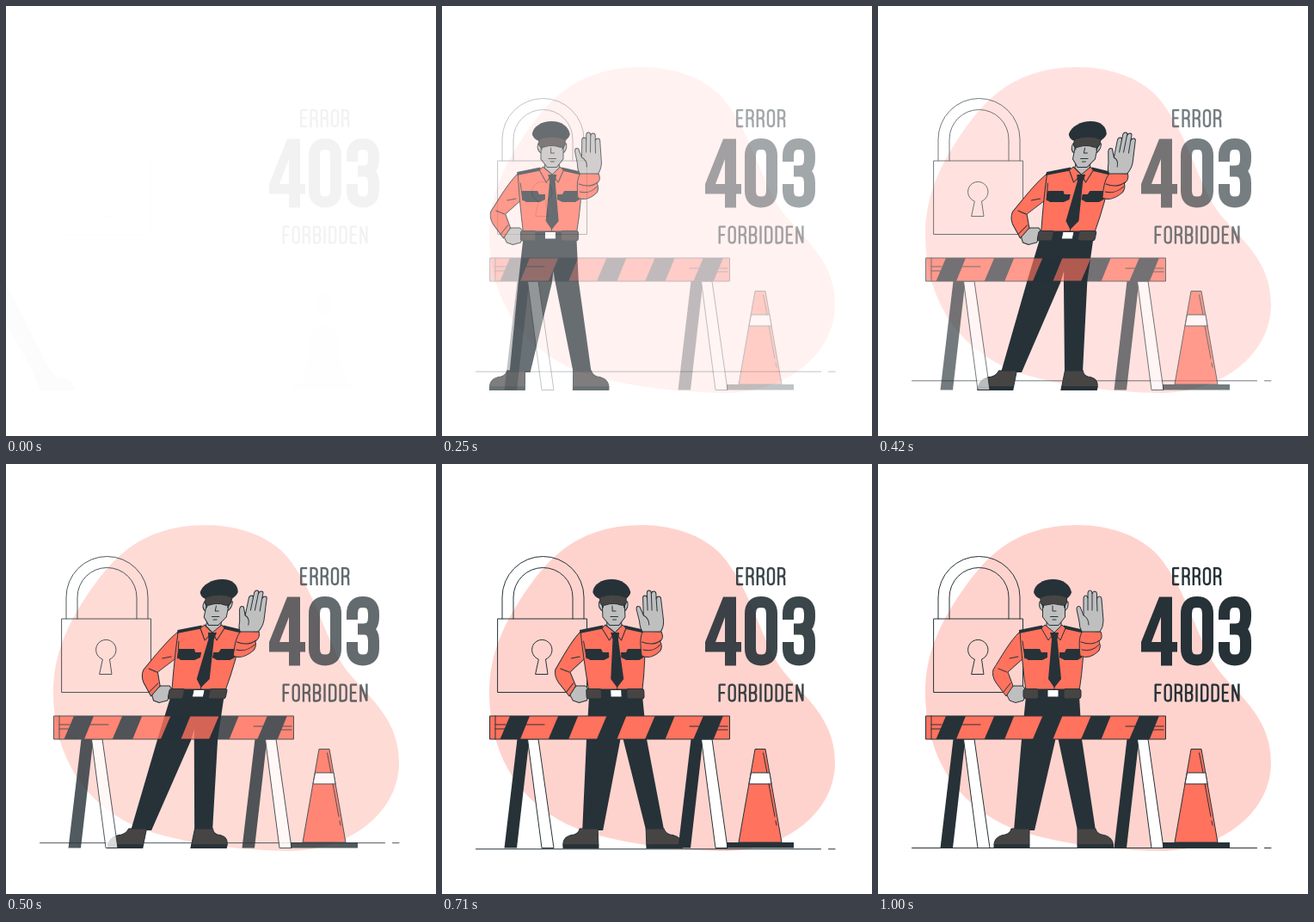
An HTML page that plays this animation: 500x500 px, repeating every 1.04 s.

```html
<!DOCTYPE html>
<html lang="en">
<head>
<meta charset="utf-8">
<title>Error 403 Forbidden</title>
<style>
  html, body { margin: 0; width: 100%; height: 100%; overflow: hidden; background: #fff; }
  svg { display: block; width: 100%; height: 100%; }
  .line { fill: none; stroke: #263238; stroke-width: 1; stroke-linejoin: round; stroke-linecap: round; }
  .ink { fill: #263238; }
  .red { fill: #ff725e; stroke: #263238; stroke-width: 1; stroke-linejoin: round; }
  .white { fill: #fff; stroke: #263238; stroke-width: 1; stroke-linejoin: round; }
  .skin { fill: #bfbfbf; stroke: #263238; stroke-width: 1; stroke-linejoin: round; }
  .gear { fill: #474444; stroke: #263238; stroke-width: 1; stroke-linejoin: round; }
  .type { fill: none; stroke: #263238; stroke-width: 2.4; stroke-linejoin: bevel; }
  .digit { fill: none; stroke: #263238; stroke-width: 13; }
</style>
</head>
<body>
<svg viewBox="0 0 500 500" role="img" aria-label="Error 403 Forbidden">
  <g class="fade">
    <path fill="#ffd3cd" d="M233 71C150 71 118 118 92 156C70 190 54 225 55 270C57 345 95 400 160 425C215 444 280 449 330 450C400 449 457 405 457 347C457 285 405 262 386 224C366 185 358 150 331 113C310 84 270 71 233 71Z"/>
  </g>

  <g id="floor"><path class="line" d="M39.5 446.5H440.5M449.5 446.5H457"/></g>

  <g class="fade">
    <path class="line" d="M65 180H168.5V265.5H65Z"/>
    <path class="line" d="M70 180V155A47.5 47.5 0 0 1 165 155V180M83 180V155A34.5 34.5 0 0 1 152 155V180"/>
    <path class="line" d="M112 227A11.7 11.7 0 1 1 120.5 227L123 244.5H109Z"/>
  </g>

  <g id="guard">
    <!-- legs and shoes -->
    <path class="ink" d="M172 270H234L237 320L253 426H232L210 322L207.5 308L206 322L182 426H158L167 320Z"/>
    <path class="gear" d="M155 424H176V443H135C135 436 140 432 148 431Q154 429 155 424Z"/>
    <path class="gear" d="M232 424H253Q254 429 260 431C268 432 273 436 273.5 443H232Z"/>
    <path class="ink" d="M134.5 442.5H176.5V447H134.5ZM231.5 442.5H274V447H231.5Z"/>
    <!-- arm on the hip -->
    <path class="skin" d="M151 262L158 258H168L172 262L172.5 266L169 275L160 277.5L153 275L150 269Z"/>
    <path class="red" d="M165 195C153 206 143 225 134 239Q132 246 137 254L149 270L157 258L151 242L171 224Z"/>
    <path class="line" d="M140 238L150 242M153 226L163 224M146 265L154 255"/>
    <!-- torso -->
    <path class="red" d="M165 195L192 189H215L239 195Q240 226 234 264H172Q167 226 165 195Z"/>
    <path class="ink" d="M164 193L191 187.5V191.5L164 197ZM216 187.5L240 193L240.5 197L216 191.5Z"/>
    <path class="ink" d="M170 215H188L190 219H197V225L191 228H175L170 225ZM211 219H217L219 215H237V225L232 228H217L211 225Z"/>
    <path class="line" d="M205 202V262M168 206L171 226"/>
    <path class="skin" d="M196 180H213V191L205 198L196 191Z"/>
    <path class="red" d="M194 187L205 196L198 205L190 191ZM214 187L205 196L212 205L218 191Z"/>
    <path class="ink" d="M200 196H210L208.5 204L213 250L205 260L198 250L202 204Z"/>
    <!-- head -->
    <path class="skin" d="M192 160H188Q186 168 192 171ZM217 160H221Q222 168 217 171Z"/>
    <path class="skin" d="M191.5 156H217.5V178L210 187.5H199L191.5 178Z"/>
    <path class="line" d="M203 165V171H207M200.5 177.5H209M203 181H207"/>
    <path class="ink" d="M190 154H193V168L190.5 164ZM216 154H219L218.5 164L216 168Z"/>
    <path class="ink" d="M181 149C182 140 192 134 203.500 134S223 140 225 149Q224.500 153 219 157H189Q182 154 181 149Z"/>
    <path class="gear" d="M189 155Q204 149 219.5 155V161Q218 165 213 164Q204 161 195 164Q190 165 189 161Z"/>
    <!-- belt -->
    <path class="ink" d="M171 261.5H235V273H171Z"/>
    <path class="gear" d="M171 261.5H184Q186.5 261.5 186.5 264V271Q186.5 273 184 273H172Q169 273 169 270V264Q169 261.5 171 261.5ZM218 261.5H233Q236 261.5 236 264V270Q236 273 233 273H218Q216 273 216 270V264Q216 261.5 218 261.5Z"/>
    <path class="white" d="M197 262.5H210V271H197Z"/>
    <!-- raised arm -->
    <path class="red" d="M238 194C233 201 234 212 235 223Q246 228 257 217Q260 212 257 206Q262 203 259 195Z"/>
    <path class="line" d="M236 207Q249 212 258 205M237 216Q249 219 257 210"/>
    <path class="skin" d="M237 195Q234 190 234 183L231 169Q231 164 235 166L239 176V156Q239 153 241.5 153T244 156V150Q244 147 246.500 147T249 150V151Q249.5 148 252 148T254.5 151V157Q255 154 257.500 154T260 157L262 182Q262 190 258 195Z"/>
    <path class="line" d="M244 156V170M249 151V170M254.5 157L255 171M239 176Q245 179 245 187"/>
  </g>

  <g class="fade">
    <g id="stands"></g>
    <path class="red" d="M55.5 293H334.5V320H55.5Z"/>
    <g id="stripes"></g>
    <path class="line" d="M62 293V320M62 303H74M97 303H119M62 308H90M288 305H303M322 305H332M320 309H332"/>
  </g>

  <g class="fade">
    <path class="red" d="M364 331.5H376L395 440H345Z"/>
    <path class="white" d="M359.5 359H381L383 372H357Z"/>
    <path class="line" d="M373.5 336L378 359M380 372L387 410M388 415L389 420"/>
    <path class="ink" d="M331 440H409V446.5H331Z"/>
  </g>

  <g id="words">
    <path class="ink" fill-rule="evenodd" d="M327 154.5H342V207H348V218.5H342V234.5H329V218.5H306V207ZM329 178L318 207H329Z"/>
    <path class="digit" d="M358.500 174Q358.500 160.500 371 160.500T383.500 174V214.500Q383.500 228 371 228T358.500 214.500Z"/>
    <path class="digit" d="M402.500 181V174Q402.500 160.500 415 160.500T427.500 174V178Q427.500 192 416 192H409M416 192Q427.500 192 427.500 206V214.500Q427.500 228 415 228T402.500 214.500V207"/>
  </g>
</svg>
<script>
const $ = id => document.getElementById(id);

function add(parent, cls, d, shift = [0, 0]) {
  const path = document.createElementNS("http://www.w3.org/2000/svg", "path");
  path.setAttribute("class", cls);
  path.setAttribute("d", d);
  path.setAttribute("transform", `translate(${shift})`);
  parent.append(path);
}

// Narrow capitals: advance width and strokes
const bowl = "M1.2 1.1H4.5Q8.2 1.1 8.2 5V7Q8.2 10.6 4.5 10.6H1.2";
const letters = {
  E: [11.4, "M8.2 1.1H1.2V20H8.2M1.2 10.4H7.4"],
  F: [11, "M8.2 1.1H1.2V21M1.2 10.6H7.4"],
  R: [12.2, bowl + "M1.2 0V21M4.5 10.6Q8.1 10.6 8.1 14V18Q8.1 20 8.6 21"],
  O: [12.2, "M1.2 5Q1.2 1.1 4.7 1.1T8.2 5V16Q8.2 20 4.7 20T1.2 16Z"],
  B: [12.4, bowl + "M1.2 0V20H4.5Q8.3 20 8.3 16V14Q8.3 10.6 4.5 10.6"],
  I: [5.7, "M1.2 0V21"],
  D: [12.4, "M1.2 1.1H4.5Q8.3 1.1 8.3 5V16Q8.3 20 4.5 20H1.2Z"],
  N: [12, "M1.2 21V1L8.2 20V0"]
};

function write(word, x, y) {
  for (const c of word) {
    const [advance, d] = letters[c];
    add($("words"), "type", d, [x, y]);
    x += advance;
  }
}
write("ERROR", 342, 120);
write("FORBIDDEN", 321.5, 255.5);

for (const x of [0, 202]) {
  add($("stands"), "ink", "M87.5 320H101.5L87 446.5H72.5Z", [x, 0]);
  add($("stands"), "white", "M99.5 320H112L130 446.5H116Z", [x, 0]);
}
for (let i = 0; i < 5; i++) {
  add($("stripes"), "ink", "M79 293H102L91 320H67.5Z", [i * 56.2, 0]);
}

function bezier(x1, y1, x2, y2) {
  const at = (a, b, s) => 3 * (1 - s) ** 2 * s * a + 3 * (1 - s) * s * s * b + s ** 3;
  return x => {
    if (x <= 0) return 0;
    if (x >= 1) return 1;
    let lo = 0, hi = 1;
    for (let i = 0; i < 30; i++) {
      const mid = (lo + hi) / 2;
      if (at(x1, x2, mid) < x) lo = mid; else hi = mid;
    }
    return at(y1, y2, lo);
  };
}
const swing = bezier(.36, -.01, .5, 1.38);
const easeOut = bezier(0, 0, .58, 1);

const LOOP = 1040, FPS = 24, LEAD = 0.033;
const fades = document.querySelectorAll(".fade");
const setAlpha = (el, a) => { el.style.opacity = Math.min(1, Math.max(0, a)); };

// Eased value through keyframes of [time, value]
function track(t, keys) {
  for (let i = 1; i < keys.length; i++) {
    const [t0, a] = keys[i - 1], [t1, b] = keys[i];
    if (t < t1) return a + (b - a) * swing((t - t0) / (t1 - t0));
  }
  return keys[keys.length - 1][1];
}

function draw(ms) {
  const step = Math.min(24, Math.floor(ms * FPS / 1000 + 0.1));
  const t = step / FPS + LEAD;
  const p = swing(t);

  fades.forEach(el => setAlpha(el, p));
  setAlpha($("words"), easeOut(t));
  setAlpha($("floor"), p);
  $("floor").setAttribute("transform", `translate(0 ${30 * (p - 1)})`);

  const skew = Math.tan(track(t, [[0, 20], [.6, -10], [.8, 2], [1, 0]]) * Math.PI / 180);
  const dx = track(t, [[0, -250], [.6, 0]]) - skew * 294;
  $("guard").setAttribute("transform", `matrix(1 0 ${skew} 1 ${dx} 0)`);
  setAlpha($("guard"), track(t, [[0, 0], [.6, 1]]));
}

const start = performance.now();
function tick() {
  draw((performance.now() - start) % LOOP);
  requestAnimationFrame(tick);
}
tick();
</script>
</body>
</html>
```
